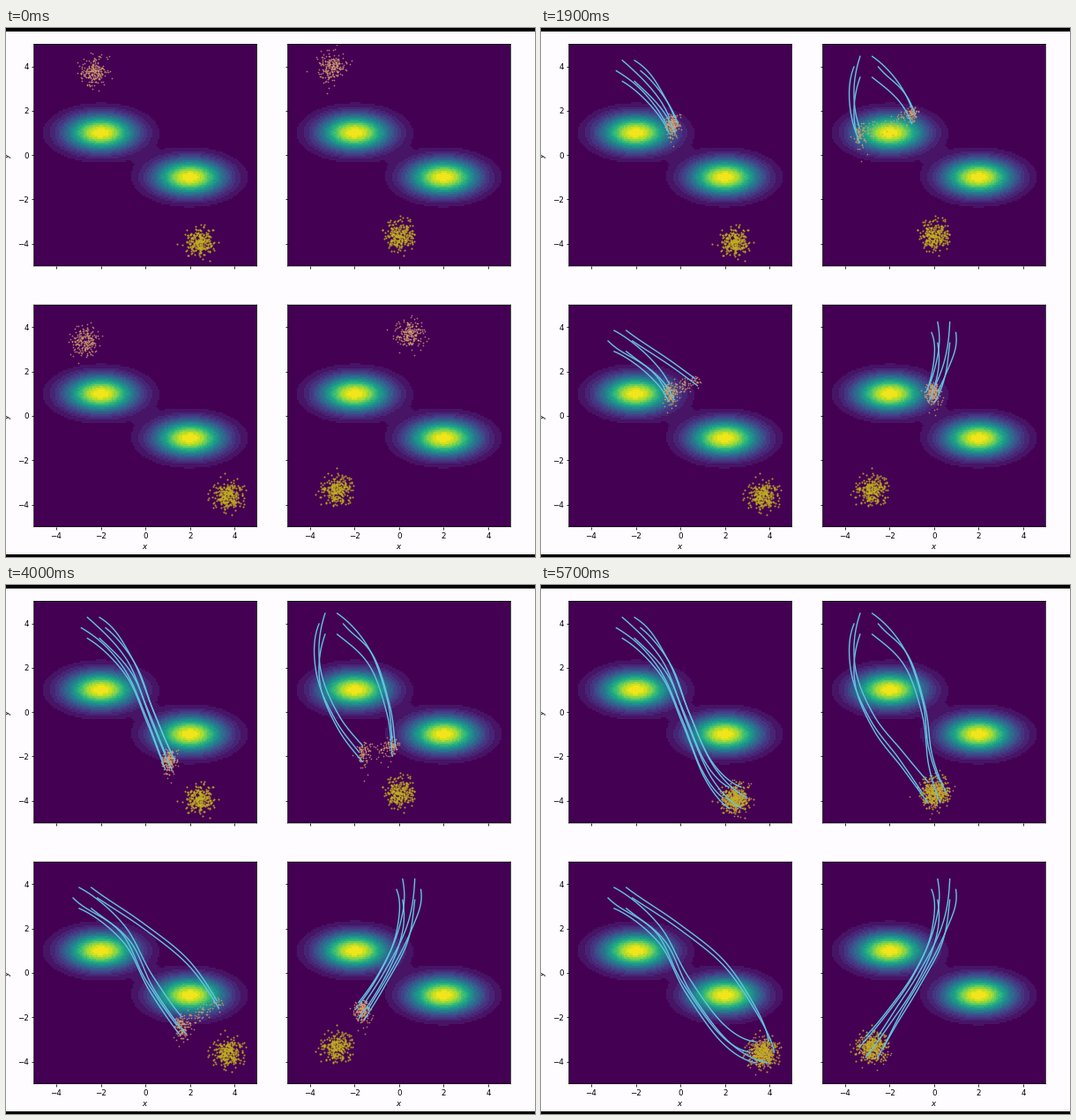
A matplotlib script for the animation above (5800 ms loop, 600 px wide and 600 px high).

```python
import numpy as np
import matplotlib.pyplot as plt
from matplotlib.animation import FuncAnimation
from matplotlib.patches import Rectangle

SIZE, DPI = 600, 100
FRAMES, STEP_MS = 58, 100
PX = 72 / DPI
LINE, MOVING, GOAL = "#63c4e4", "#d3a06e", "#c2ae20"
SIGMA, RING = 0.32, 0.545
BAR = 3.5 / SIZE

# start, goal and the points passed at 1/4, 1/2 and 3/4 of the way;
# a split (direction, edge, softness) sends one side along the second route
PANELS = [
    dict(start=(-2.33, 3.80), goal=(2.45, -3.86),
         routes=[[(-.74, 2.12), (.22, -.15), (1.25, -2.55)]]),
    dict(start=(-3.05, 3.98), goal=(0, -3.62), split=((1, 0), 0, .05),
         routes=[[(-3.40, 1.72), (-2.60, -.42), (-1.25, -2.12)],
                 [(-1.50, 2.54), (-.62, .25), (-.40, -1.95)]]),
    dict(start=(-2.70, 3.38), goal=(3.67, -3.58), split=((.8, .6), .25, .07),
         routes=[[(-.86, 1.85), (.33, -.45), (2.00, -2.68)],
                 [(-.20, 1.88), (1.90, .30), (3.30, -1.95)]]),
    dict(start=(.43, 3.76), goal=(-2.80, -3.34),
         routes=[[(.19, 1.78), (-.79, -.25), (-1.88, -1.95)]]),
]

t = np.linspace(0, 1, FRAMES)[:, None]
arch = np.sin(np.pi * t)


def smooth(points):
    """Cubic curve through evenly timed points, one row per frame."""
    p = np.array(points)
    m = np.gradient(p, axis=0, edge_order=2)
    pos = t[:, 0] * (len(p) - 1)
    i = np.minimum(pos.astype(int), len(p) - 2)
    u = (pos - i)[:, None]
    return ((1 + 2 * u) * (1 - u) ** 2 * p[i] + u * (1 - u) ** 2 * m[i]
            + u ** 2 * (3 - 2 * u) * p[i + 1] + u ** 2 * (u - 1) * m[i + 1])


def travel(panel, offset, rng, jitter=0):
    """Positions (frame, particle, xy) of particles with these start offsets."""
    dx, dy = offset.T
    # The crowd is squeezed halfway and trails off downwards
    spread = np.stack([(1 - .6 * arch) * dx,
                       (1 - .28 * arch) * (dy - .45 * arch * dy ** 2)], axis=-1)
    paths = [smooth([panel["start"], *via, panel["goal"]])[:, None]
             for via in panel["routes"]]
    mean = paths[0]
    if "split" in panel:
        side, edge, soft = panel["split"]
        w = 1 / (1 + np.exp((edge - offset @ side) / soft))
        mean = mean + w[:, None] * (paths[1] - paths[0])
    # Random initial momentum that dies away
    kick = rng.normal(0, .07, offset.shape)
    sway = (np.sin(5 * np.pi * t) * np.exp(-6 * t))[..., None] * kick
    drift = arch[..., None] * rng.normal(0, 1, offset.shape) * jitter
    return mean + spread + sway + drift


def density(cells=126, levels=20):
    g = (np.arange(cells) + .5) / cells * 10 - 5
    x, y = np.meshgrid(g, g)
    d = sum(np.exp(-((x - cx) / 1.07) ** 2 / 2 - ((y - cy) / .55) ** 2 / 2)
            for cx, cy in [(-2, 1), (2, -1)])
    return np.minimum(np.floor(d * levels) / (levels - 1), 1) * .98


def make_axes(fig, row, col):
    x, y, w, h = 31.7 + 287.8 * col, 18.4 + 295.8 * row, 252.8, 251.5
    ax = fig.add_axes([x / SIZE, 1 - (y + h) / SIZE, w / SIZE, h / SIZE])
    # The map stops just short of the right edge
    ax.imshow(density(), extent=(-5, 4.95, -5, 5), origin="lower",
              cmap="viridis", vmin=0, vmax=1, aspect="auto",
              interpolation="nearest")
    ticks = range(-4, 5, 2)
    ax.set(xlim=(-5, 5), ylim=(-5, 5), xticks=ticks, yticks=ticks)
    ax.tick_params(length=3 * PX, width=.8 * PX, pad=3 * PX, labelsize=8.8 * PX,
                   labelleft=col == 0, labelbottom=row == 1)
    for spine in ax.spines.values():
        spine.set(linewidth=.8 * PX, snap=False)
    style = dict(ha="center", va="center", fontsize=8.8 * PX)
    if col == 0:
        fig.text(3 / SIZE, 1 - (y + h / 2) / SIZE, "$y$", rotation=90, **style)
    if row == 1:
        fig.text((x + w / 2) / SIZE, 1 - 588.5 / SIZE, "$x$", **style)
    return ax


plt.rcParams.update({"font.family": "DejaVu Sans",
                     "mathtext.fontset": "dejavusans"})
fig = plt.figure(figsize=(SIZE / DPI, SIZE / DPI), dpi=DPI, facecolor="#fefcfe")
for bottom in (0, 1 - BAR):
    fig.add_artist(Rectangle((0, bottom), 1, BAR, color="black", lw=0,
                             transform=fig.transFigure))

rng = np.random.default_rng(7)
angles = np.arange(6) * np.pi / 3
ring = RING * np.column_stack([np.cos(angles), np.sin(angles)])
dots = dict(marker="o", ls="", mew=0)
clouds, trails = [], []
for k, panel in enumerate(PANELS):
    ax = make_axes(fig, *divmod(k, 2))
    goal = panel["goal"] + rng.normal(0, SIGMA, (250, 2))
    ax.plot(*goal.T, color=GOAL, ms=2.1 * PX, alpha=.85, zorder=3, **dots)
    cloud, = ax.plot([], [], color=MOVING, ms=1.7 * PX, alpha=.8, zorder=2, **dots)
    crowd = rng.normal(0, SIGMA, (210, 2))
    clouds.append((cloud, travel(panel, crowd, rng, jitter=.05)))
    for path in travel(panel, ring, rng).swapaxes(0, 1):
        line, = ax.plot([], [], color=LINE, lw=1.4 * PX, zorder=4)
        trails.append((line, path))


def draw(i):
    for cloud, pos in clouds:
        cloud.set_data(*pos[i].T)
    for line, path in trails:
        line.set_data(*path[:i + 1].T)
    return [artist for artist, _ in clouds + trails]


anim = FuncAnimation(fig, draw, frames=FRAMES, interval=STEP_MS,
                     repeat=True, repeat_delay=0)
plt.show()
```
